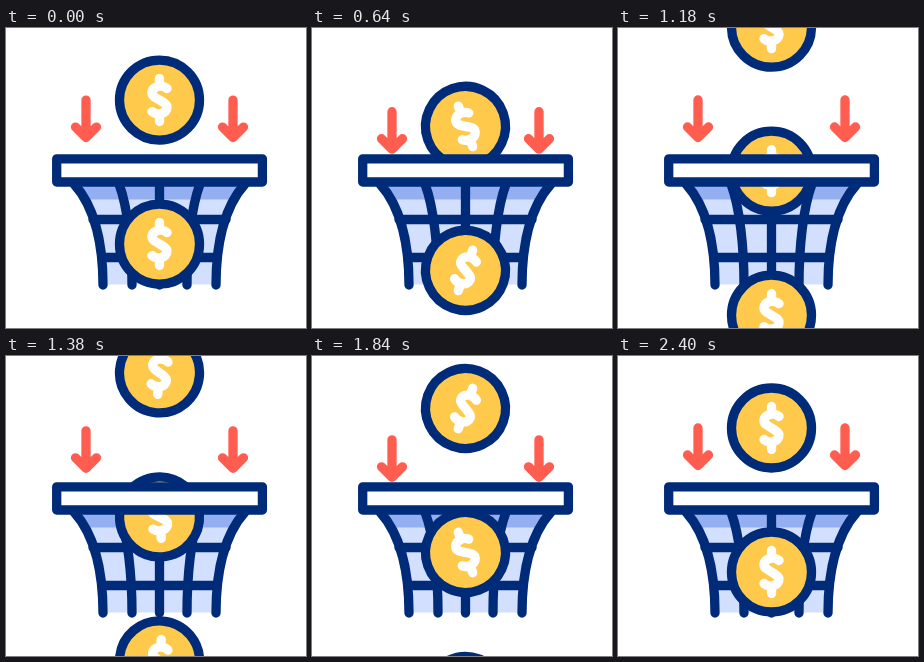
Write an HTML page that moves like this. It is 300 by 300 pixels and loops after 2.42 s.

```html
<!DOCTYPE html>
<html lang="en">
<head>
<meta charset="utf-8">
<title>Coins falling through a basket</title>
<style>
  html, body { margin: 0; height: 100%; overflow: hidden; background: #fff; }
  svg { display: block; width: 100vw; height: 100vh; }
  .line { fill: none; stroke: #002b78; stroke-width: 9.3; stroke-linecap: round; stroke-linejoin: round; }
</style>
</head>
<body>
<svg viewBox="0 0 300 300">
  <defs>
    <path id="netShape" d="M68 156C90 180 97 220 97 256.500H210C210 220 217 180 239 156Z"/>
    <clipPath id="netClip"><use href="#netShape"/></clipPath>
    <g id="coin">
      <circle class="line" r="40" style="fill:#ffca4c"/>
      <path class="line" style="stroke:#fff" d="M0-21.500V-14M0 14V21.500M7.500-11.500C3-15.500-7.500-14.500-7.500-7C-7.500-1.500 7.500 1.500 7.500 7C7.500 14.500-3 15.500-7.500 11.500"/>
    </g>
    <path id="arrow" class="line" style="stroke:#ff5d50" d="M0 72V108M-10.500 99L0 109.500L10.500 99"/>
  </defs>

  <use href="#netShape" fill="#d3dfff"/>
  <rect x="60" y="156" width="190" height="15.500" fill="#94aff1" clip-path="url(#netClip)"/>
  <g class="line">
    <path d="M68 156C90 180 97 220 97 257M239 156C217 180 210 220 210 257"/>
    <path d="M113 156C122 180 126 220 126 257M194 156C185 180 181 220 181 257M153.500 156V257"/>
    <path d="M87 191.500H220M96 229.500H211"/>
  </g>

  <use class="coin" href="#coin"/>
  <use class="coin" href="#coin"/>
  <use class="coin" href="#coin"/>

  <g id="arrows">
    <use href="#arrow" x="80"/>
    <use href="#arrow" x="227"/>
  </g>
  <rect class="line" x="50.700" y="130.800" width="205.700" height="23.200" style="fill:#fff"/>
</svg>
<script>
  const LOOP = 2420, LEAD = 20, DROP = 144, TILT = 20;
  const coins = [...document.querySelectorAll('.coin')];
  const arrows = document.getElementById('arrows');
  const ease = u => u * u * (3 - 2 * u);

  function draw(time) {
    const p = ((time + LEAD) % LOOP) / LOOP;
    const half = (p * 2) % 1;
    const swing = ease(1 - Math.abs(2 * half - 1));

    // Coins, top to bottom: each one drops into the next one's place.
    coins.forEach((coin, i) => {
      const y = 72 + (i - 1 + ease(p)) * DROP;
      const angle = (i === 1 ? -TILT : TILT) * swing;
      coin.setAttribute('transform', `translate(153.5 ${y}) rotate(${angle})`);
    });

    arrows.setAttribute('transform', `translate(0 ${12 * swing})`);
  }

  const start = performance.now();
  function tick() {
    draw(performance.now() - start);
    requestAnimationFrame(tick);
  }
  tick();
</script>
</body>
</html>
```
